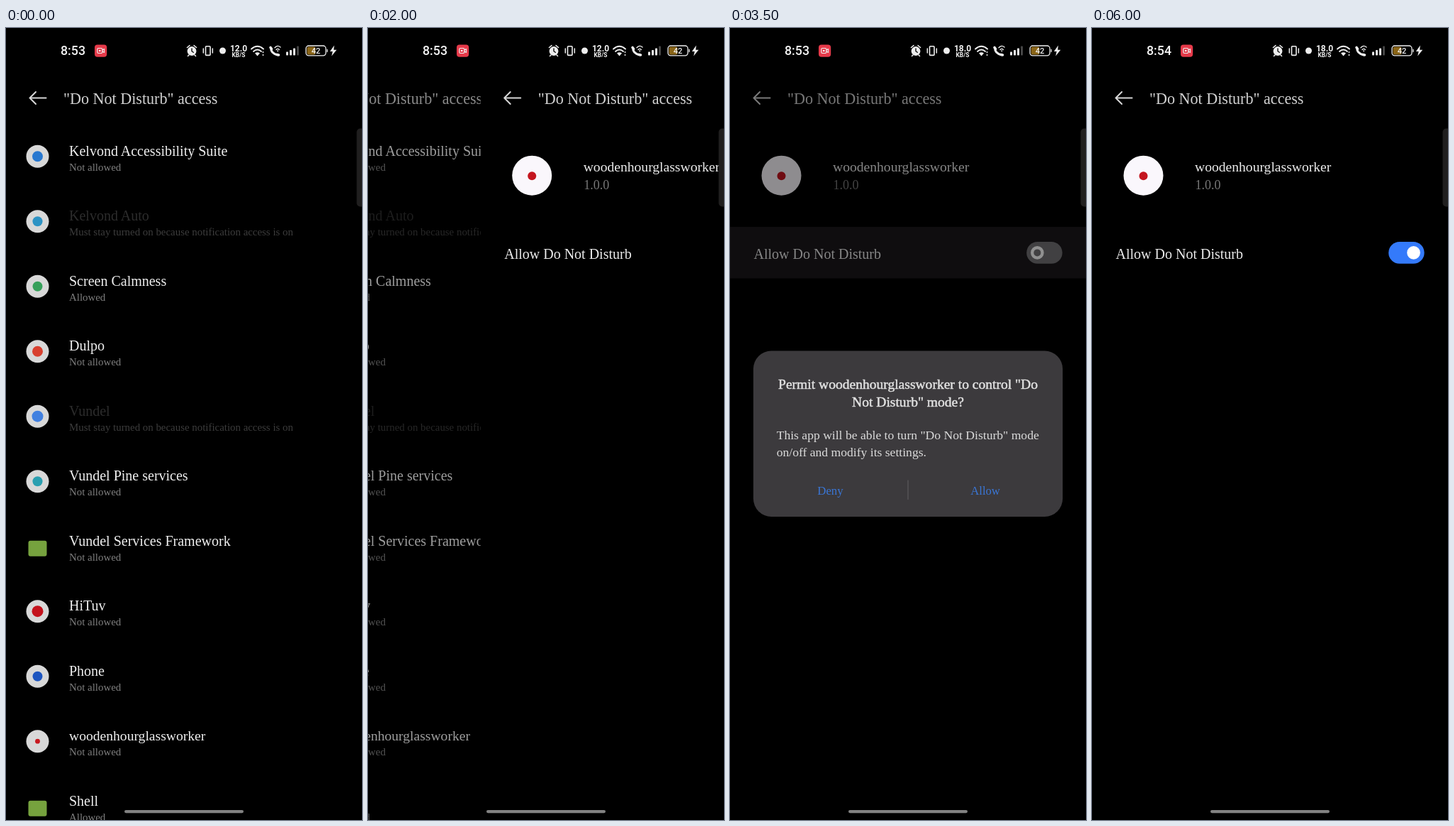
An HTML page that plays this animation: 502 px wide and 1115 px high, repeating every 6100 ms.

```html
<!DOCTYPE html>
<html lang="en">
<head>
<meta charset="utf-8">
<title>Do Not Disturb access</title>
<style>
  html, body { margin: 0; width: 100%; height: 100%; overflow: hidden; background: #000; }
  svg { display: block; width: 100vw; height: 100vh; }
  text { font-family: "Liberation Serif", "Times New Roman", serif; }
  .ui { font-family: Roboto, sans-serif; fill: #f2f2f2; }
  .mid { text-anchor: middle; }
  .line { fill: none; stroke: #f0f0f0; stroke-linecap: round; stroke-linejoin: round; }
</style>
</head>
<body>
<svg id="stage" viewBox="0 0 502 1115"></svg>
<script>
const W = 502, H = 1115, LOOP = 6100;
const APP = 'woodenhourglassworker';
const HEADING = '"Do Not Disturb" access';

const text = (x, y, size, fill, str, extra = '') =>
  `<text x="${x}" y="${y}" font-size="${size}" fill="${fill}" ${extra}>${str}</text>`;
const rect = (x, y, w, h, fill, rx = 0, extra = '') =>
  `<rect x="${x}" y="${y}" width="${w}" height="${h}" rx="${rx}" fill="${fill}" ${extra}/>`;
const dot = (x, y, r, fill, extra = '') =>
  `<circle cx="${x}" cy="${y}" r="${r}" fill="${fill}" ${extra}/>`;
const line = (d, width, extra = '') =>
  `<path class="line" d="${d}" stroke-width="${width}" ${extra}/>`;

// name, state, icon colour, icon radius (0 = square icon)
const OFF = 'Not allowed', ON = 'Allowed';
const LOCKED = 'Must stay turned on because notification access is on';
const rows = [
  ['Kelvond Accessibility Suite', OFF, '#2878d0', 7.5],
  ['Kelvond Auto', LOCKED, '#2d93c4', 7],
  ['Screen Calmness', ON, '#36a05a', 7],
  ['Dulpo', OFF, '#d8402f', 7.5],
  ['Vundel', LOCKED, '#4180e0', 8],
  ['Vundel Pine services', OFF, '#2a9fb0', 7],
  ['Vundel Services Framework', OFF, '#76a23e', 0],
  ['HiTuv', OFF, '#c4121c', 8],
  ['Phone', OFF, '#1d55c0', 7],
  [APP, OFF, '#c81a20', 3.4],
  ['Shell', ON, '#76a23e', 0]
];

const header =
  line('M56.500 98.500H33.500M42 90L33.500 98.500L42 107', 2, 'style="stroke:#d6d6d6"') +
  text(81, 107, 22.1, '#d2d2d2', HEADING);

function row([name, state, color, r], i) {
  const y = 180.7 + i * 91.5;
  const locked = state === LOCKED;
  const icon = r
    ? dot(44.5, y, 16, '#d8d8d8') + dot(44.5, y, r, color)
    : rect(31.5, y - 8, 26, 22, color, 3);
  return icon +
    text(89, y - 1, name === APP ? 19.6 : 20, locked ? '#2c2c2c' : '#f0f0f0', name) +
    text(89, y + 20, 14.9, locked ? '#3c3c3c' : '#7e7e7e', state);
}

// Faint glitter of the press ripple, thinning out from the finger
function sparkles() {
  let seed = 7, out = '';
  const rnd = () => (seed = seed * 16807 % 2147483647) / 2147483647;
  for (let i = 0; i < 700; i++) {
    const x = 290 + (rnd() + rnd() - 1) * 130;
    out += rect(x.toFixed(1), (959 + rnd() * 90).toFixed(1), 1, 1, '#fff', 0,
      `opacity="${(.05 + rnd() * .2).toFixed(2)}"`);
  }
  return out;
}

const status =
  text(77, 38, 17.8, '#f2f2f2', '8:53', 'id="clock" class="ui" font-weight="500"') +
  rect(125, 23.5, 17.2, 17.2, '#e63a4a', 4) +
  `<rect class="line" x="128.800" y="28.500" width="7" height="7" rx="1.500" stroke-width="1.200"/>` +
  line('M136 31l2.500-1.500v5l-2.500-1.500', 1.1) + dot(132.3, 32, 1.2, '#fff') +
  // alarm
  dot(262, 32.5, 6.4, '#eee') + line('M255.500 27.500l3.500-3M268.500 27.500l-3.500-3M258 38l-1.500 1.500M266 38l1.500 1.500', 1.6) +
  line('M262 29v3.700l2.300 1.600', 1.3, 'style="stroke:#000"') +
  // vibrate
  `<rect class="line" x="281.500" y="25.800" width="6.500" height="12.600" rx="1" stroke-width="1.600"/>` +
  line('M278.300 29v6M291.300 29v6', 1.5) +
  dot(305.5, 32, 4.5, '#eee') +
  text(328, 32.5, 12, '#f2f2f2', '12.0', 'id="speed" class="ui mid" font-weight="700"') +
  text(328, 40.8, 8.4, '#f2f2f2', 'KB/S', 'class="ui mid" font-weight="700"') +
  // wi-fi
  line('M346 29.500q8.500-7.500 17 0M349 33q5.500-4.800 11 0', 1.9) +
  `<path d="M351 35.500q3.500-2.500 7 0l-3.500 4z" fill="#eee"/>` +
  line('M362.500 34v0M362.500 38v0', 2) +
  // wi-fi calling
  line('M373.500 28q0 8 9.500 9.800', 3) + line('M373 27.500l1.500 2M382 37.500l2.500.500', 3.6) +
  line('M379 27.800q3.800-4.500 8-.8M381 30.500q2.200-2.300 4.300 0', 1.4) + dot(383.2, 32.3, 1, '#eee') +
  // signal
  [5, 7.5, 10, 13].map((h, i) =>
    rect(395 + i * 5, 38.5 - h, 3, h, i < 3 ? '#eee' : '#444', .8)).join('') +
  // battery
  rect(424.5, 26.500, 12, 11, '#8a6517', 2) +
  `<rect class="line" x="423" y="25" width="28" height="13.800" rx="3.800" stroke-width="1.300"/>` +
  line('M453 30.500v3', 1.3) +
  text(437, 36, 11, '#f2f2f2', '42', 'class="ui mid" font-weight="500"') +
  `<path d="M462.800 24.500l-6 8.500h3.800l-1.400 6.500 7-8.800h-4z" fill="#eee"/>`;

const detail =
  rect(0, 60, W, H - 60, '#000') +
  rect(0, 280, W, 72.5, '#1a171b', 0, 'id="press" opacity="0"') +
  header +
  dot(72.500, 207.7, 28, '#faf7fc') + dot(72.500, 208.3, 6, '#c4161f') +
  text(145, 202, 19.6, '#ececec', APP) +
  text(145.5, 226.5, 18, '#777', '1.0.0') +
  text(33.5, 325, 20, '#ececec', 'Allow Do Not Disturb') +
  rect(418.2, 301, 50.4, 30.8, '#727174', 15.4, 'id="track"') +
  `<rect id="knob" y="307.100" height="18.600" rx="9.300" fill="#fff"/>` +
  dot(433.3, 316.4, 5, '#727174', 'id="hole"');

const bold = 'class="mid" stroke="#f4f4f4" stroke-width=".5"';
const dialog =
  rect(28, 452, 446, 238.5, '#413f42', 26) +
  text(251, 506.5, 20, '#f4f4f4', `Permit ${APP} to control "Do`, bold) +
  text(251, 532.5, 20, '#f4f4f4', 'Not Disturb" mode?', bold) +
  text(61.5, 579, 18, '#ececec', 'This app will be able to turn "Do Not Disturb" mode') +
  text(61.5, 604, 18, '#ececec', 'on/off and modify its settings.') +
  text(139, 659, 17.2, '#3f7fe6', 'Deny', 'class="mid"') +
  text(362.5, 659, 17, '#3f7fe6', 'Allow', 'class="mid"') +
  rect(250.5, 638, 1, 28, '#68666a');

document.getElementById('stage').innerHTML =
  rect(0, 0, W, H, '#000') +
  `<g id="list">${header}${rows.map(row).join('')}<g id="glitter">${sparkles()}</g></g>` +
  `<g id="detail">${detail}</g>` +
  rect(0, 60, W, H - 60, '#000', 0, 'id="dim"') +
  `<g id="dialog">${dialog}</g>` + status +
  rect(494.5, 141.5, 12, 110, '#201f1f', 5) +
  rect(167, 1101, 168, 4.2, '#828282', 2.1) +
  `<g id="touch">${dot(0, 0, 17, 'none', 'stroke="#77779a" stroke-width="4" opacity=".3"')}${dot(0, 0, 15, '#e2dee2')}</g>`;

const el = {};
document.querySelectorAll('[id]').forEach(e => el[e.id] = e);
const set = (id, attrs) => { for (const k in attrs) el[id].setAttribute(k, attrs[k]); };

const span = (t, from, to) => Math.min(1, Math.max(0, (t - from) / (to - from)));
const outCubic = x => 1 - (1 - x) ** 3;
const smooth = x => x * x * (3 - 2 * x);
const mix = (a, b, p) => a + (b - a) * p;

// x, y, finger down, finger up, gone
const taps = [
  [307, 1001, 1600, 1800, 2000],
  [436, 318, 3200, 3300, 3440],
  [335.5, 666.5, 4880, 4990, 5165]
];

function draw(t) {
  // page change
  const slide = outCubic(span(t, 1730, 2210) ** 2);
  set('list', { transform: `translate(${-.4 * W * slide})`, opacity: 1 - .5 * slide,
    visibility: slide < 1 ? 'visible' : 'hidden' });
  set('detail', { transform: `translate(${W * (1 - slide)})`,
    visibility: slide > 0 ? 'visible' : 'hidden' });
  set('glitter', { opacity: span(t, 1640, 1780) * (1 - span(t, 1820, 2000)) });

  // dialog
  const open = outCubic(span(t, 3340, 3800));
  const close = 1 - span(t, 4960, 5126);
  const scale = mix(.92, 1, open);
  set('dim', { opacity: .6 * open * close });
  set('dialog', {
    opacity: Math.min(1, open * 1.28) * close,
    transform: `translate(251 571.200) scale(${scale}) translate(-251 -571.200)`
  });
  set('press', { opacity: span(t, 3190, 3260) * (1 - span(t, 3520, 3720)) });

  // switch
  const on = smooth(span(t, 4980, 5220));
  const stretch = 6 * Math.sin(Math.PI * on);
  const tint = [[114, 52], [113, 122], [116, 250]].map(([a, b]) => Math.round(mix(a, b, on)));
  const track = `rgb(${tint})`;
  set('track', { fill: track });
  set('knob', { x: mix(424, 444.2, on) - stretch / 2, width: 18.6 + stretch });
  set('hole', { cx: mix(433.3, 453.5, on), r: 5 * Math.max(0, 1 - 2.1 * on), fill: track });

  // finger
  const tap = taps.find(([, , down, , gone]) => t >= down && t < gone);
  if (tap) set('touch', { transform: `translate(${tap[0]} ${tap[1]})`,
    opacity: .36 * (1 - span(t, tap[3], tap[4])) });
  else set('touch', { opacity: 0 });

  el.speed.textContent = t < 2700 ? '12.0' : '18.0';
  el.clock.textContent = t < 4200 ? '8:53' : '8:54';
}

function frame() {
  draw(performance.now() % LOOP);
  requestAnimationFrame(frame);
}
frame();
</script>
</body>
</html>
```
